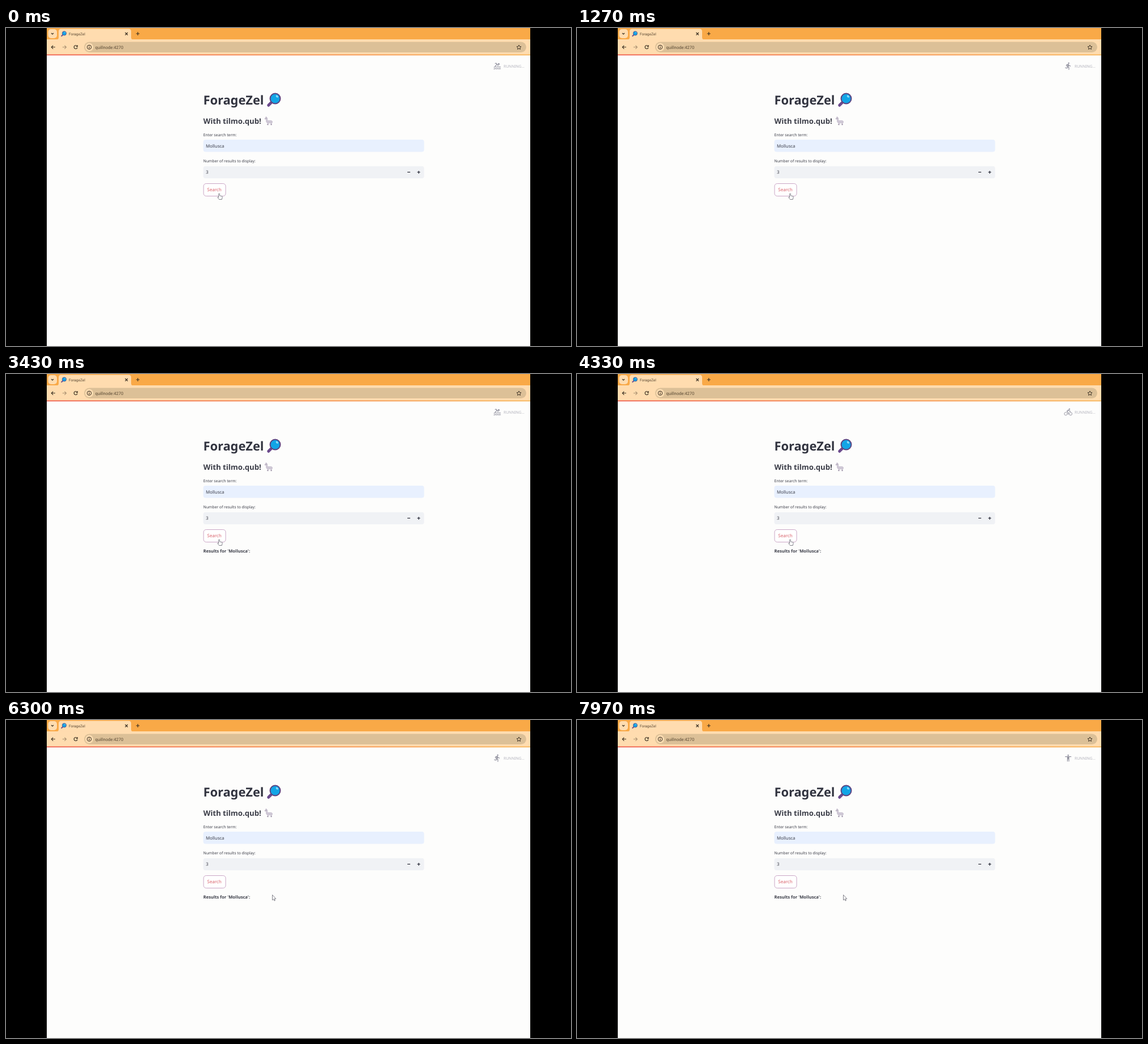
Animation, 998 px wide and 561 px high, one loop 8 s. Source, as an HTML page:

```html
<!DOCTYPE html>
<html lang="en">
<head>
<meta charset="utf-8">
<title>Search page</title>
<style>
  html, body { margin: 0; width: 100%; height: 100%; overflow: hidden; background: #000; }
  svg { display: block; width: 100%; height: 100%; }
  text { font-family: "Noto Sans", "Open Sans", sans-serif; fill: #3b3d48; white-space: pre; text-rendering: geometricPrecision; }
  .chrome { font-family: Roboto, Inter, sans-serif; fill: #5b4a35; }
  .label { font-size: 6.8px; }
  .value { font-size: 7.8px; }
  .line { fill: none; stroke: #33291d; stroke-width: 1.1; }
  .sport { fill: #92929f; stroke: none; }
  .stroke { fill: none; stroke: #92929f; }
  .pointer { fill: #fff; stroke: #77777f; stroke-width: .9; stroke-linejoin: round; }
</style>
</head>
<body>
<svg viewBox="0 0 998 561">
  <defs>
    <linearGradient id="strip">
      <stop offset="0" stop-color="#f0604f"/>
      <stop offset=".5" stop-color="#f58a4c"/>
      <stop offset="1" stop-color="#f8b65a"/>
    </linearGradient>
    <g id="lens">
      <path d="M-5 5L-10.3 10.3" stroke="#6b4a8c" stroke-width="5" stroke-linecap="round"/>
      <circle cx="1.5" cy="-1.5" r="9" fill="#12a5e6" stroke="#5c4380" stroke-width="2"/>
      <ellipse cx="4.8" cy="-5.3" rx="2.4" ry="1.6" fill="#8edbfa" transform="rotate(40 4.8 -5.3)"/>
    </g>
  </defs>

  <rect x="72" width="854" height="561" fill="#fdfdfc"/>

  <!-- browser bars -->
  <rect x="72" width="854" height="21" fill="#f9a947"/>
  <rect x="72" y="20" width="854" height="27" fill="#ffdcaf"/>
  <rect x="74.5" y="2" width="15.5" height="16" rx="5" fill="#ffdcaf"/>
  <path d="M89 20.5Q93 20.5 93 16.5V6Q93 1.500 97.500 1.500H216.500Q221 1.500 221 6V16.500Q221 20.500 225 20.500Z" fill="#ffdcaf"/>
  <rect x="138" y="24.500" width="781" height="18.500" rx="9.250" fill="#dcc097"/>
  <circle cx="147" cy="33.800" r="7.200" fill="#fbdbb0"/>
  <rect x="72" y="46.500" width="854" height="1.800" fill="url(#strip)"/>
  <use href="#lens" transform="translate(102.300 10) scale(.4)"/>
  <text class="chrome" x="111" y="12.700" font-size="6.500">ForageZel</text>
  <text class="chrome" x="157.500" y="36.500" font-size="7.600">quillnode:4270</text>
  <g class="line">
    <path d="M80 9L82 11L84 9M210.500 8L215 12.500M215 8L210.500 12.500M229.800 10H235.800M232.800 7V13"/>
    <path d="M86.800 33.800H80.200M83.200 30.800L80.200 33.800L83.200 36.800"/>
    <path d="M99.800 33.800H106.400M103.400 30.800L106.400 33.800L103.400 36.800" stroke="#a88f70"/>
    <path d="M125.600 32A3 3 0 1 0 126 34.500M126.200 30.300V32.700H123.800"/>
    <circle cx="147" cy="33.800" r="3.700" stroke-width="1"/>
    <path d="M147 33.300V36M147 31.500V32.400"/>
    <path d="M906 30L907.200 32.600L910 32.900L907.900 34.800L908.500 37.600L906 36.200L903.500 37.600L904.100 34.800L902 32.900L904.800 32.600Z" stroke-width=".9"/>
  </g>

  <!-- running status -->
  <g transform="translate(860.300 59.800) scale(.61)">
    <g id="swim">
      <circle class="sport" cx="16.500" cy="6" r="2.500"/>
      <path class="stroke" stroke-width="2" d="M5.500 4.500L9 4L15.500 11.500M5.500 12.500L11 7.500"/>
      <path class="stroke" stroke-width="1.900" d="M2 15.500Q4 15.500 5.300 14.700T8.700 14.700T12 14.700T15.300 14.700T18.700 14.700T22 15.500M2 20.500Q4 20.500 5.300 19.700T8.700 19.700T12 19.700T15.300 19.700T18.700 19.700T22 20.500"/>
    </g>
    <g id="bike">
      <circle class="sport" cx="15.500" cy="3.500" r="2"/>
      <circle class="stroke" cx="5" cy="17" r="4.250" stroke-width="1.500"/>
      <circle class="stroke" cx="19" cy="17" r="4.250" stroke-width="1.500"/>
      <path class="stroke" stroke-width="2" stroke-linejoin="round" d="M19.100 10Q16.500 10 14.700 8.200L12.200 6L8.300 9.800L12 13.300V19"/>
    </g>
    <g id="stand">
      <circle class="sport" cx="12" cy="4" r="2"/>
      <path class="sport" d="M21 9H15V22H13V16H11V22H9V9H3V7H21Z"/>
    </g>
    <g id="run">
      <circle class="sport" cx="13.500" cy="3.500" r="2"/>
      <path class="sport" d="M9.890 19.380l1-4.400 2.100 2v6h2v-7.500l-2.100-2 .6-3c1.300 1.500 3.300 2.500 5.500 2.500v-2c-1.900 0-3.500-1-4.300-2.400l-1-1.600c-.4-.6-1-1-1.700-1-.3 0-.5.1-.8.1l-5.200 2.200v4.700h2v-3.400l1.800-.7-1.600 8.100-4.900-1-.4 2 7 1.400z"/>
    </g>
  </g>
  <text x="879" y="69.500" font-size="6.700" style="fill:#b3b3bd">RUNNING...</text>

  <!-- page -->
  <text x="348.500" y="135" font-size="21.800" font-weight="700" style="fill:#31333f">ForageZel</text>
  <use href="#lens" transform="translate(474 126)"/>
  <text x="348.500" y="168.500" font-size="13.200" font-weight="600">With tilmo.qub!</text>
  <path d="M457.300 159L459 158L459.300 156L460.300 157.700L461.800 158.800V163.300H468.500L470.300 164.500L470.500 167L469.300 166.300V171H467.800V167.800H463.500V171H462V168L459.800 166L459.300 161L457 160.700Z" fill="#cfc8d6" stroke="#bdb4c5" stroke-width=".6" stroke-linejoin="round"/>
  <path d="M462 171V169.800M468.500 171V169.800" stroke="#7f748a" stroke-width="1.400"/>
  <circle cx="459.600" cy="159" r=".5" fill="#55505c"/>

  <text class="label" x="348.500" y="190.500">Enter search term:</text>
  <rect x="348.500" y="197" width="390" height="21.500" rx="4" fill="#e8f0fe"/>
  <text class="value" x="353" y="210.800">Mollusca</text>
  <text class="label" x="348.500" y="237">Number of results to display:</text>
  <rect x="348.500" y="243.700" width="390" height="21.500" rx="4" fill="#f0f2f5"/>
  <text class="value" x="353" y="257.300">3</text>
  <path d="M709 254.400H714M726.500 254.400H731.500M729 251.900V256.900" stroke="#31333f" stroke-width="1.300"/>
  <rect x="349" y="274.500" width="39" height="22" rx="4.500" fill="#fff" stroke="#cba6c6"/>
  <text x="355.300" y="287.800" font-size="8" style="fill:#d9606a">Search</text>
  <text id="results" x="348.500" y="315" font-size="7.600" font-weight="600">Results for 'Mollusca':</text>

  <g id="cursor">
    <path id="hand" class="pointer" d="M-.9 .9Q0 0 .9 .9V4.300L4.800 5.200Q5.800 5.500 5.600 6.600L4.700 11H0L-2.700 7.500Q-2.800 6.300-1.700 6.700L-.9 7.400Z"/>
    <path id="arrow" class="pointer" d="M0 0V9.300L2.100 7.400L3.500 10.500L4.900 9.900L3.500 6.900H6.300Z"/>
  </g>
</svg>
<script>
  const LOOP = 8000, CYCLE = 1740, LEAD = 79;
  const order = ["swim", "bike", "run", "swim", "bike", "stand", "run", "bike", "stand"];
  const sports = ["swim", "bike", "stand", "run"];
  const get = id => document.getElementById(id);
  const show = (id, on) => get(id).setAttribute("visibility", on ? "visible" : "hidden");
  const ease = p => p * p * (3 - 2 * p);

  function draw(t) {
    const slot = Math.floor((t + LEAD) % CYCLE / CYCLE * order.length);
    for (const s of sports) show(s, s === order[slot]);
    show("results", t >= 1970);

    const p = ease(Math.min(1, Math.max(0, (t - 4600) / 400)));
    const x = 376.5 + 94 * p, y = 291.500 + 17 * p;
    const inside = x < 388 && y < 297;
    get("cursor").setAttribute("transform", `translate(${x} ${y})`);
    show("hand", inside);
    show("arrow", !inside);
  }

  const start = performance.now();
  function tick() {
    draw((performance.now() - start) % LOOP);
    requestAnimationFrame(tick);
  }
  tick();
</script>
</body>
</html>
```
